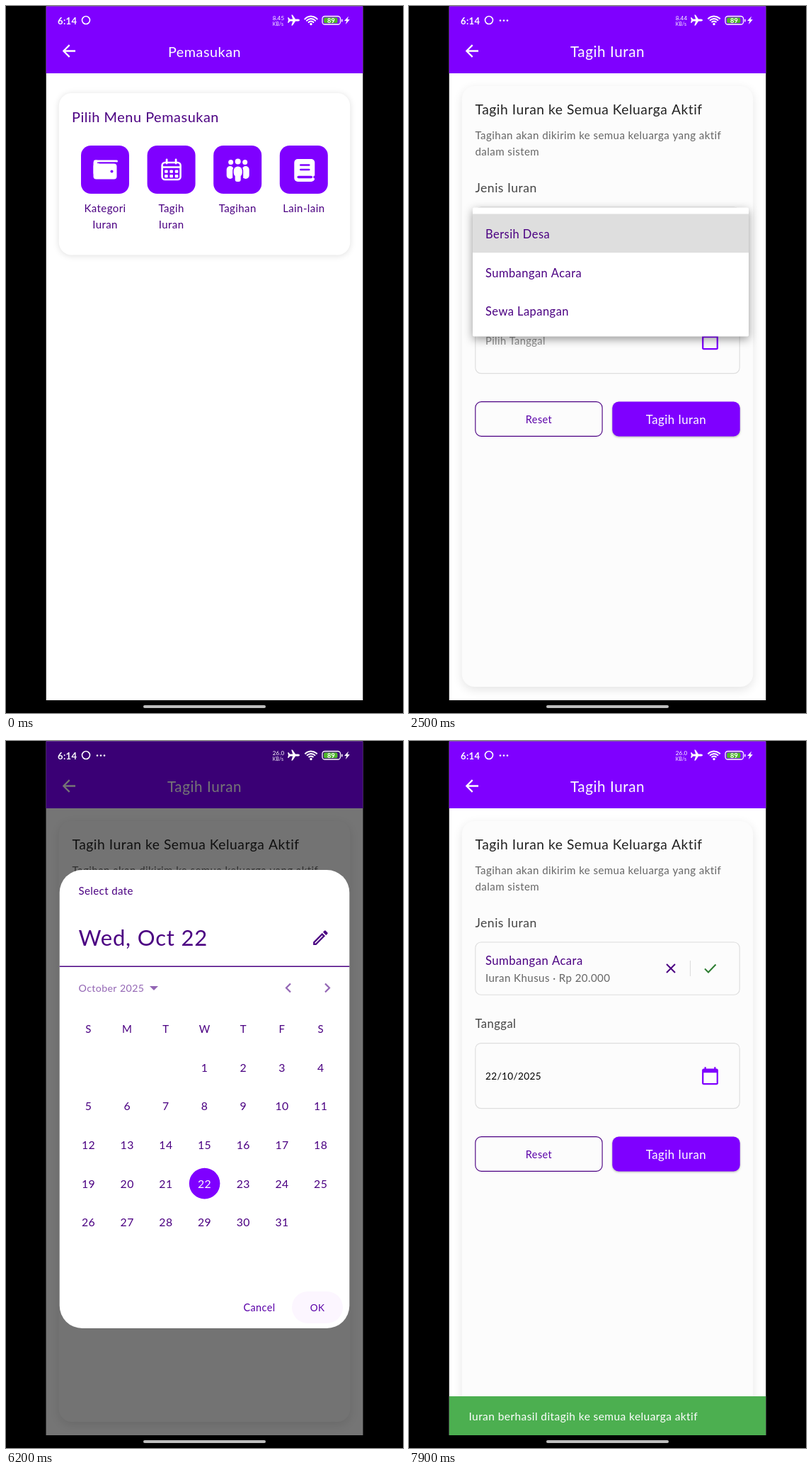
An HTML page with a canvas that plays this animation: 561x998 px, repeating every 8 s.

```html
<!DOCTYPE html>
<html lang="id">
<head>
<meta charset="utf-8">
<title>Tagih Iuran</title>
<style>
  html, body { margin: 0; width: 100%; height: 100%; overflow: hidden; background: #000; }
  canvas { display: block; }
</style>
</head>
<body>
<canvas id="stage" width="561" height="998"></canvas>
<script>
const ctx = document.getElementById('stage').getContext('2d');
const LOOP = 8000, STEP = 100;
const LEFT = 56.5, WIDTH = 448, BOTTOM = 980, DP = 1.142;
const PURPLE = '#7f00ff', INDIGO = '#4b0082', LILAC = '#9366b4', WHITE = '#fff';
const ROW = 54.7;

const ramp = (t, from, to) => Math.min(1, Math.max(0, (t - from) / (to - from)));
const easeOut = p => 1 - (1 - p) ** 3;
const mix = (a, b, p) => a + (b - a) * p;

// ---------- drawing helpers ----------
function layer(alpha, draw) {
  if (alpha <= 0) return;
  ctx.save();
  ctx.globalAlpha *= alpha;
  draw();
  ctx.restore();
}

function box(x, y, w, h, r, fill, { stroke, line = DP, shadow } = {}) {
  ctx.save();
  ctx.beginPath();
  ctx.roundRect(x, y, w, h, r);
  if (shadow) [ctx.shadowColor, ctx.shadowBlur, ctx.shadowOffsetY] = shadow;
  if (fill) { ctx.fillStyle = fill; ctx.fill(); }
  if (stroke) { ctx.strokeStyle = stroke; ctx.lineWidth = line; ctx.stroke(); }
  ctx.restore();
}

const band = (y, h, fill) => box(LEFT, y, WIDTH, h, 0, fill);

// y is the middle of the capital letters
function text(str, x, y, size, color, align = 'left', weight = 400) {
  ctx.font = `${weight} ${size}px Lato, "Open Sans", sans-serif`;
  ctx.letterSpacing = size * 0.027 + 'px';
  ctx.textAlign = align;
  ctx.fillStyle = color;
  ctx.fillText(str, x, y + size * 0.36);
}

function dot(x, y, r, color) {
  ctx.fillStyle = color;
  ctx.beginPath();
  ctx.arc(x, y, r, 0, 7);
  ctx.fill();
}

function icon(path, x, y, scale, color) {
  ctx.save();
  ctx.translate(x, y);
  ctx.scale(scale, scale);
  ctx.fillStyle = color;
  ctx.fill(new Path2D(path));
  ctx.restore();
}

function line(path, color, width, cap = 'butt') {
  ctx.strokeStyle = color;
  ctx.lineWidth = width;
  ctx.lineCap = cap;
  ctx.stroke(new Path2D(path));
}

// ---------- shared parts ----------
function header(title, size) {
  band(0, 95, PURPLE);
  icon('M20 11H7.8l5.6-5.6L12 4l-8 8 8 8 1.4-1.4L7.8 13H20z', 75.2, 49.8, DP, WHITE);
  text(title, 280.5, 64.5, size, WHITE, 'center');
}

function statusBar(t) {
  text('6:14', 73, 21, 13, WHITE, 'left', 700);
  ctx.beginPath();
  ctx.arc(113, 20, 5.5, 0, 7);
  ctx.strokeStyle = WHITE;
  ctx.lineWidth = 1.6;
  ctx.stroke();
  layer(ramp(t, 0, 300), () => [129, 134, 139].forEach(x => dot(x, 20.5, 1.3, WHITE)));

  const speed = t < 1900 ? '8.45' : t < 5000 ? '8.44' : '26.0';
  text(speed, 385, 17.5, 8, WHITE, 'center');
  text('KB/s', 384.5, 25.5, 6.8, WHITE, 'center');

  icon('M415 20q0-1.4-2-1.5h-4l-4-6h-1.8l2 6h-4l-1.7-2.2h-1.5l1 3.7-1 3.7h1.5l1.7-2.2h4l-2 6h1.8l4-6h4q2-.1 2-1.5z', 0, 0, 1, WHITE);
  ctx.strokeStyle = WHITE;
  ctx.lineWidth = 2;
  for (const r of [4.5, 8, 11.5]) {
    ctx.beginPath();
    ctx.arc(431, 26, r, -Math.PI * 0.77, -Math.PI * 0.23);
    ctx.stroke();
  }
  dot(431, 25.5, 1.7, WHITE);

  box(447, 14.5, 25.5, 11.5, 3.5, null, { stroke: WHITE, line: 1.3 });
  box(449, 16.3, 19.5, 8, 2, '#4fb52c');
  text('89', 459.5, 20.5, 9, WHITE, 'center', 700);
  box(474, 18.5, 1.5, 4, 1, WHITE);
  icon('M484 14.5l-6 6.5h3.3l-1.5 5 6-7h-3.3z', 0, 0, 1, WHITE);
}

// ---------- menu page ----------
const tileIcons = [
  x => {
    line(`M${x + 30} 219H${x - 1}`, WHITE, 3, 'round');
    box(x - 3, 217.5, 8, 22, 4, WHITE);
    box(x - 3, 222.5, 33, 22, 4, WHITE);
    line(`M${x + 3} 221.2H${x + 29}`, PURPLE, 1.5, 'round');
    dot(x + 23, 233.5, 2, PURPLE);
  },
  x => {
    box(x + 0.5, 221, 26, 24, 4, null, { stroke: WHITE, line: 2.6 });
    line(`M${x + 7} 217v5M${x + 20} 217v5`, WHITE, 2.8, 'round');
    line(`M${x} 227.5h27`, WHITE, 2.5);
    for (let i = 0; i < 6; i++)
      box(x + 4 + (i % 3) * 7.3, 231.5 + (i > 2) * 6.5, 4.6, 4.2, 1, WHITE);
  },
  x => {
    for (const side of [-1, 1]) {
      dot(x + 14 + side * 10, 220.5, 3.5, WHITE);
      box(x + 14 + side * 11 - 5, 226, 10, 18, 5, WHITE);
    }
    box(x + 6.5, 225.5, 15, 23, 7, PURPLE);
    dot(x + 14, 219.5, 4, WHITE);
    box(x + 8, 226.5, 12, 15, 6, WHITE);
    box(x + 10, 235, 8, 13, 3, WHITE);
  },
  x => {
    box(x, 216, 29, 32, 5, WHITE);
    line(`M${x + 9} 224.5h12M${x + 9} 231h12`, PURPLE, 2.6, 'round');
    line(`M${x + 6} 241.5h18`, PURPLE, 3.6, 'round');
    dot(x + 29, 241.5, 2, PURPLE);
  },
];

function menuPage() {
  band(0, BOTTOM, WHITE);
  header('Pemasukan', 19.8);
  box(74.8, 123, 411.4, 228.5, 18, WHITE, { shadow: ['rgba(0,0,0,.13)', 10, 1] });
  text('Pilih Menu Pemasukan', 93, 156.5, 19.9, INDIGO);
  const labels = [['Kategori', 'Iuran'], ['Tagih', 'Iuran'], ['Tagihan'], ['Lain-lain']];
  labels.forEach((words, i) => {
    const x = 106 + 93.6 * i;
    box(x, 197, 68, 68, 14, PURPLE);
    tileIcons[i](x + 20.5);
    words.forEach((word, k) => text(word, x + 34, 286 + 22.8 * k, 15, INDIGO, 'center'));
  });
}

// ---------- billing form ----------
const calendarIcon = 'M20 3h-1V1h-2v2H7V1H5v2H4c-1.1 0-2 .9-2 2v16c0 1.1.9 2 2 2h16c1.1 0 2-.9 2-2V5c0-1.1-.9-2-2-2zm0 18H4V8h16v13z';

function formPage(t) {
  const field = (y, h) => box(93.8, y, 373.4, h, 8, '#fcfcfc', { stroke: '#dedede' });
  band(0, BOTTOM, WHITE);
  header('Tagih Iuran', 20.7);
  box(74.8, 113, 411.4, 848, 18, '#fcfcfc', { shadow: ['rgba(0,0,0,.11)', 14, 4] });
  text('Tagih Iuran ke Semua Keluarga Aktif', 93.5, 146.5, 19.3, '#222');
  text('Tagihan akan dikirim ke semua keluarga yang aktif', 93.5, 183, 15.1, '#666');
  text('dalam sistem', 93.5, 205.5, 15.1, '#666');

  text('Jenis Iuran', 93.5, 257, 17.6, '#444');
  field(284, 74.3);
  if (t < 3100) {
    text('Pilih Jenis Iuran', 108, 322, 17.5, '#8c8c8c');
    icon('M433 319h12l-6 6z', 0, 0, 1, '#666');
  } else {
    text('Sumbangan Acara', 108, 310, 16.7, INDIGO);
    text('Iuran Khusus · Rp 20.000', 108, 334.5, 15.1, '#666');
    line('M364 315l12 12M376 315l-12 12', INDIGO, 2);
    line('M397.5 310v22', '#ddd', DP);
    line('M418 321.5l5 5L433.5 315.5', '#2e7d32', 2);
  }

  text('Tanggal', 93.5, 399.5, 16.6, '#444');
  field(426.6, 92);
  if (t < 6300) text('Pilih Tanggal', 108, 473, 14.7, '#8c8c8c');
  else text('22/10/2025', 108, 473, 13.6, '#000');
  icon(calendarIcon, 411.8, 459, DP, PURPLE);

  box(93.8, 558.6, 179.3, 48.8, 8.5, null, { stroke: INDIGO });
  text('Reset', 183.5, 583.5, 14.5, '#5a00a8', 'center');
  box(287.3, 558.6, 180.4, 48.8, 9, PURPLE, { shadow: ['rgba(0,0,0,.3)', 3, 1.2] });
  if (t >= 7000 && t < 7300) box(287.3, 558.6, 180.4, 48.8, 9, 'rgba(255,255,255,.1)');
  text('Tagih Iuran', 377.5, 583.5, 16.8, WHITE, 'center');
}

function dropdown(t) {
  const p = ramp(t, 2150, 2450);
  const grow = easeOut(ramp(p, 0.25, 0.5));
  const top = mix(294, 284.5, grow), bottom = mix(348.5, 466.5, grow);
  layer(ramp(p, 0, 0.25) * (1 - ramp(t, 3020, 3170)), () => {
    box(90, top, 390, bottom - top, 2, WHITE, { shadow: ['rgba(0,0,0,.4)', 13, 4] });
    ctx.beginPath();
    ctx.rect(90, top, 390, bottom - top);
    ctx.clip();
    box(90, 293.5, 390, ROW, 0, '#dedede');
    ['Bersih Desa', 'Sumbangan Acara', 'Sewa Lapangan'].forEach((name, i) =>
      layer(ramp(p, 0.4 + i * 0.15, 0.7 + i * 0.15), () =>
        text(name, 108, 322 + ROW * i, 16.5, INDIGO)));
  });
}

// ---------- date picker ----------
const pencilIcon = 'M14.06 9.02l.92.92L5.92 19H5v-.92l9.06-9.06M17.66 3c-.25 0-.51.1-.7.29l-1.83 1.83 3.75 3.75 1.83-1.83c.39-.39.39-1.02 0-1.41l-2.34-2.34c-.2-.2-.45-.29-.71-.29zm-3.6 3.19L3 17.25V21h3.75L17.81 9.94z';

function datePicker(t) {
  layer(ramp(t, 4420, 4560) * (1 - ramp(t, 6220, 6360)), () => {
    band(0, BOTTOM, 'rgba(0,0,0,.54)');
    box(75.7, 182, 409.6, 647, 32, WHITE);
    text('Select date', 102.5, 212, 15, INDIGO);
    text('Wed, Oct 22', 102.5, 278, 31, INDIGO);
    icon(pencilIcon, 430.7, 264, DP, INDIGO);
    line('M75.7 318.2h409.6', INDIGO, 1.4);

    text('October 2025', 102.5, 349, 14.2, LILAC);
    icon('M203 346h12l-6 6z', 0, 0, 1, LILAC);
    line('M402 342.5l-6 6 6 6M451 342.5l6 6-6 6', LILAC, 2.2);

    const column = i => 116.5 + ROW * i;
    [...'SMTWTFS'].forEach((day, i) => text(day, column(i), 406.5, 15, INDIGO, 'center'));
    for (let day = 1; day <= 31; day++) {
      const cell = day + 2, x = column(cell % 7), y = 461 + ROW * Math.floor(cell / 7);
      const selected = day === 22;
      if (selected) dot(x, y - 0.5, 21.8, PURPLE);
      text(String(day), x, y, 15.8, selected ? WHITE : INDIGO, 'center');
    }

    layer(ramp(t, 6000, 6200), () => box(404, 777, 72, 45, 22.5, '#fcf6ff'));
    text('Cancel', 358, 800, 14.4, '#5a00a8', 'center');
    text('OK', 440, 800, 13.6, '#5a00a8', 'center');
  });
}

function snackbar(t) {
  const p = ramp(t, 7250, 7500), height = 55 * easeOut(p);
  if (!p) return;
  ctx.save();
  ctx.beginPath();
  ctx.rect(LEFT, BOTTOM - height, WIDTH, height);
  ctx.clip();
  band(BOTTOM - height, height, '#4caf50');
  layer(ramp(p, 0.4, 1), () =>
    text('Iuran berhasil ditagih ke semua keluarga aktif', 84.5, 1008 - height, 15.5, WHITE));
  ctx.restore();
}

// ---------- timeline ----------
function render(t) {
  ctx.fillStyle = '#000';
  ctx.fillRect(0, 0, 561, 998);
  ctx.save();
  ctx.beginPath();
  ctx.rect(LEFT, 0.5, WIDTH, BOTTOM - 0.5);
  ctx.clip();
  if (t < 1600) menuPage();
  layer(ramp(t, 1220, 1300), () => {
    const scale = t < 1600 ? 1 - 0.15 * Math.exp((1200 - t) / 49) : 1;
    ctx.translate(280.5, 490);
    ctx.scale(scale, scale);
    ctx.translate(-280.5, -490);
    formPage(t);
  });
  dropdown(t);
  datePicker(t);
  snackbar(t);
  statusBar(t);
  ctx.restore();
  box(194, 987, 173, 4, 2, '#bdbdbd');
}

function tick() {
  render(Math.floor(performance.now() % LOOP / STEP) * STEP);
  requestAnimationFrame(tick);
}
tick();
</script>
</body>
</html>
```
